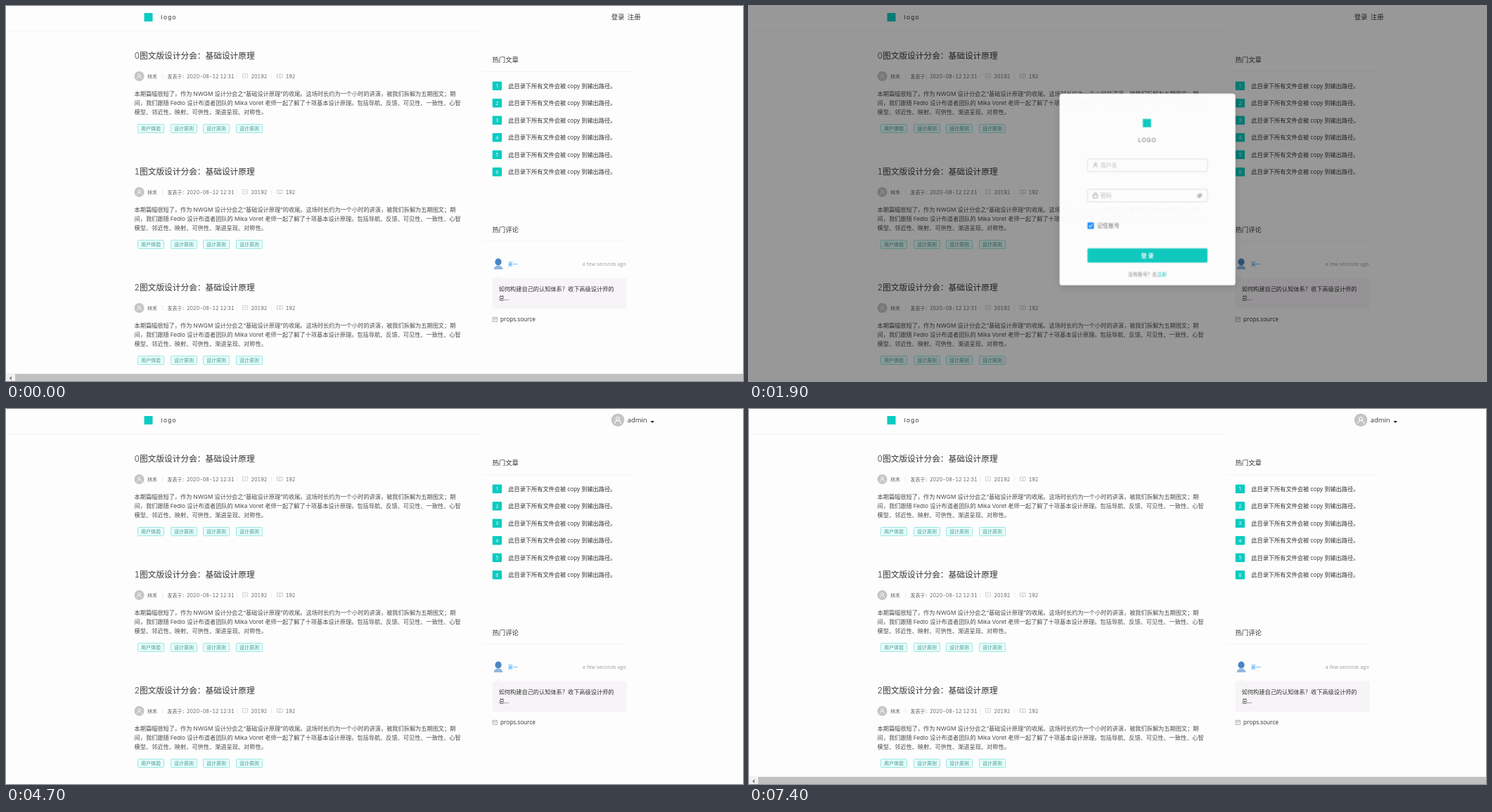
These frames come from a looping animation (1048x534 px, 9800 ms). An HTML page:

```html
<!DOCTYPE html>
<html lang="zh-CN">
<head>
<meta charset="utf-8">
<title>Login flow</title>
<style>
html, body { margin: 0; width: 100%; height: 100%; overflow: hidden; background: #fdfdfd; }
svg { display: block; width: 100vw; height: 100vh; }
text { white-space: pre; }
.ui { font-family: "Open Sans", "Noto Sans CJK SC", "Noto Sans CJK", sans-serif; }
.article { font-family: Inter, "Noto Sans CJK SC", "Noto Sans CJK", sans-serif; font-variant-numeric: tabular-nums; }
.anim { animation: 9800ms step-end infinite; }

#scrollbar { animation-name: scrollbar; }
#guest { animation-name: guest; }
#member { animation-name: member; }
#mask { animation-name: mask; }
#modal { animation-name: modal; transform-origin: 870px 16px; }
#hints { animation-name: hints; }
#filled { animation-name: filled; }
.value { animation-name: value; }
.autofill { animation-name: autofill; }
#glow { animation-name: glow; }
#popup { animation-name: popup; }
.modal-card { filter: drop-shadow(0 3px 6px rgba(0,0,0,.16)); }
.popup-card { filter: drop-shadow(0 1px 2px rgba(0,0,0,.5)); }

@keyframes scrollbar { 0% { opacity: 1 } 17.34% { opacity: 0 } 66.32%, 100% { opacity: 1 } }
@keyframes guest { 0% { opacity: 1 } 47.95%, 100% { opacity: 0 } }
@keyframes member { 0% { opacity: 0 } 47.95%, 100% { opacity: 1 } }
@keyframes mask {
  0% { opacity: 0 } 17.34% { opacity: .033 } 18.36% { opacity: .22 }
  19.38% { opacity: .4 } 20.4% { opacity: .45 } 47.95%, 100% { opacity: 0 }
}
@keyframes modal {
  0% { opacity: 0; transform: scale(.85) }
  18.36% { opacity: .81; transform: scale(.85) }
  19.38% { opacity: .97; transform: scale(.975) }
  20.4% { opacity: 1; transform: none }
  47.95%, 100% { opacity: 0; transform: none }
}
@keyframes hints { 0% { opacity: 1 } 20.4%, 100% { opacity: 0 } }
@keyframes filled { 0% { opacity: 0 } 20.4%, 100% { opacity: 1 } }
@keyframes value { 0% { fill: #888 } 23.46%, 100% { fill: #111 } }
@keyframes autofill { 0% { fill: #f0f5ff } 43.87%, 100% { fill: #e8f0fe } }
@keyframes glow { 0% { opacity: 0 } 43.87% { opacity: .8 } 45.91%, 100% { opacity: 1 } }
@keyframes popup {
  0% { opacity: 0; transform: translateY(-10px) }
  56.12% { opacity: .35; transform: translateY(-10px) }
  57.14% { opacity: .85; transform: translateY(-2px) }
  58.16% { opacity: 1; transform: none }
  66.32% { opacity: .7; transform: translateY(-2px) }
  67.34% { opacity: .2; transform: translateY(-8px) }
  68.36%, 100% { opacity: 0; transform: translateY(-10px) }
}
</style>
</head>
<body>
<svg id="stage" viewBox="0 0 1048 534" preserveAspectRatio="none"></svg>
<script>
const TEAL = '#0bcbc1', BLUE = '#1890ff', LINE = '#f1f1f1';
const SMALL = 7.03, BODY = 8.2, LARGE = 9.37, TITLE = 11.7, NOTE = 10.55;

// Text is placed by its left edge and the vertical centre of its glyphs.
const text = (x, cy, size, fill, str, extra = '') =>
  `<text x="${x}" y="${cy + size * .37}" font-size="${size}" fill="${fill}" ${extra}>${str}</text>`;
const rect = (x, y, w, h, fill, extra = '') =>
  `<rect x="${x}" y="${y}" width="${w}" height="${h}" fill="${fill}" ${extra}/>`;
const circle = (x, y, r, fill, extra = '') =>
  `<circle cx="${x}" cy="${y}" r="${r}" fill="${fill}" ${extra}/>`;
const path = (d, stroke, width = 1, extra = '') =>
  `<path d="${d}" fill="none" stroke="${stroke}" stroke-width="${width}" ${extra}/>`;
const group = (attrs, ...parts) => `<g ${attrs}>${parts.join('')}</g>`;
const range = (n, fn) => Array.from({ length: n }, (_, i) => fn(i)).join('');
const middle = 'text-anchor="middle"';

const person = (x, y, s, stroke) => group(`transform="translate(${x} ${y}) scale(${s})"`,
  circle(0, -1.4, 1.8, 'none', `stroke="${stroke}" stroke-width=".8"`),
  path('M-3.2 3.8C-3.2 -.4 3.2 -.4 3.2 3.8', stroke, .8));

const avatar = (x, y, r) => circle(x, y, r, '#c5c5c5') + person(x, y, r / 7, '#fff');

const star = (x, y, r, color, width) => range(3, i => {
  const a = Math.PI * (i / 3 + .5), dx = r * Math.cos(a), dy = r * Math.sin(a);
  return path(`M${x - dx} ${y - dy}L${x + dx} ${y + dy}`, color, width);
});

const tags = ['用户体验', '设计原则', '设计原则', '设计原则'];
const paragraph = [
  '本期篇幅很短了，作为 NWGM 设计分会之“基础设计原理”的收尾。这场时长约为一个小时的讲演，被我们拆解为五期图文；期',
  '间，我们跟随 Fedlo 设计布道者团队的 Mika Voret 老师一起了解了十项基本设计原理。包括导航、反馈、可见性、一致性、心智',
  '模型、邻近性、映射、可供性、渐进呈现、对称性。'
];

const article = i => group(`class="article" transform="translate(0 ${165 * i})"`,
  text(182.5, 70.5, TITLE, '#333', `${i}图文版设计分会：基础设计原理`, 'font-weight="300"'),
  avatar(189.5, 100, 7),
  text(201, 100, SMALL, '#666', '林禾'),
  text(229.5, 100, SMALL, '#666', '发表于：'),
  text(257, 100, SMALL, '#666', '2020-08-12 12:31'),
  [222.5, 328.5, 377.5].map(x => rect(x - .3, 96, .6, 8, '#e4e4e4')).join(''),
  path('M336.5 96.5h7v5.6h-4l-1.4 1.3v-1.3h-1.6zM338 99.4h4', '#b5b5b5', .6),
  text(348.5, 100, SMALL, '#666', '20192'),
  path('M385.5 97h3.2l.6.5.6-.5h3.2v5h-3.2l-.6.6-.6-.6h-3.2zM389.3 97.5v5', '#aaa', .6),
  text(397.7, 100, SMALL, '#666', '192'),
  paragraph.map((line, n) => text(182.5, 125 + 12.9 * n, BODY, '#4c4c4c', line)).join(''),
  tags.map((tag, n) => {
    const x = Math.round(187 + 46.6 * n) + .5;
    return rect(x, 168.5, 37, 12, '#e6fffb', 'rx="1" stroke="#9be6e0"') +
      text(x + 18.5, 174.3, SMALL, '#43928f', tag, middle);
  }).join(''));

const sidebar = () => group('class="ui"',
  text(691.5, 77, LARGE, '#333', '热门文章'),
  rect(678, 93, 217, .8, LINE),
  range(6, i => {
    const y = 113.6 + 24.5 * i;
    return rect(691.7, y - 6, 13.3, 12.5, TEAL, 'rx="1"') +
      text(698.3, y, SMALL, '#fff', i + 1, middle) +
      text(714.3, y, BODY, '#333', '此目录下所有文件会被 copy 到输出路径。');
  }),
  text(691.5, 318.5, LARGE, '#333', '热门评论'),
  rect(678, 334.6, 204, .8, LINE),
  '<ellipse cx="700" cy="364.5" rx="4.6" ry="5" fill="#4a86c4"/>',
  '<path d="M693.5 375q1-5.5 6.5-5.5t6.5 5.5z" fill="#8fb8e0"/>',
  text(713.8, 367, SMALL, BLUE, '吴一'),
  text(882, 367, SMALL, '#999', 'a few seconds ago', 'text-anchor="end" letter-spacing=".15"'),
  rect(691.5, 387.5, 191, 43.8, '#f7f4f7', 'rx="3"'),
  '<path d="M696 388l4-4 4 4z" fill="#f7f4f7"/>',
  text(700.7, 403, BODY, '#333', '如何构建自己的认知体系？收下高级设计师的'),
  text(700.7, 416, BODY, '#333', '总...'),
  path('M692 443.3h6.4v6.2h-6.4zM692 445h6.4M693.5 447h3', '#999', .7),
  text(703, 446, BODY, '#333', 'props.source'));

const header = () => group('class="ui"',
  rect(0, 35, 678, .8, LINE),
  rect(196.5, 10, 12, 12, TEAL),
  text(220.5, 15.7, BODY, '#333', 'logo', 'class="article" letter-spacing="1.4"'),
  group('id="guest" class="anim"',
    text(860.7, 16, LARGE, '#333', '登录'), text(883.8, 16, LARGE, '#333', '注册')),
  group('id="member" class="anim"',
    avatar(870, 15.7, 9.3), text(883.8, 16, LARGE, '#333', 'admin'),
    '<path d="M916.4 17h5.4l-2.7 3z" fill="#222"/>'));

const scrollbar = () => group('id="scrollbar" class="anim"',
  rect(0, 523, 1048, 11, '#f1f1f1'), rect(13, 524, 1035, 10, '#c1c1c1'),
  '<path d="M8 527v6l-3.5-3z" fill="#888"/>');

const field = y => rect(471.3, y, 175, 18.4, '#fff', 'rx="2" stroke="#d9d9d9" stroke-width=".8"');

const modal = () => group('id="modal" class="ui anim"',
  rect(430.5, 127.5, 256.5, 280, '#fff', 'rx="4" class="modal-card"'),
  rect(552, 164.5, 12, 12, TEAL),
  text(558.6, 195, BODY, '#666', 'LOGO', `class="article" letter-spacing="1" ${middle}`),
  field(222.8), field(267.2),
  person(483, 231.5, .95, '#999'),
  path('M479.5 275.5h6.5v4.2h-6.5zM480.8 275.5v-1.2q0-2 2-2t2 2v1.2', '#999', .8),
  path('M631.3 276.4q3.7-5 7.4 0q-3.7 5-7.4 0zM632.2 279.8l5.8-6.8', '#888', .8),
  circle(635, 276.4, 1.3, 'none', 'stroke="#888" stroke-width=".7"'),
  group('id="hints" class="anim"',
    text(490, 232, BODY, '#bfbfbf', '用户名'), text(490, 276.5, BODY, '#bfbfbf', '密码')),
  group('id="filled" class="anim"',
    rect(489, 225.2, 150.5, 13.6, '#e8f0fe', 'class="autofill anim"'),
    rect(489, 269.6, 140, 13.6, '#e8f0fe', 'class="autofill anim"'),
    text(489.5, 231.8, BODY, '#111', 'admin', 'class="value anim"'),
    range(6, i => circle(491.6 + 3.65 * i, 276.5, 1.35, '#111', 'class="value anim"'))),
  rect(471.3, 315.6, 9.4, 9.4, BLUE, 'rx="1.2"'),
  path('M473.5 320.2l1.9 2 3.3-3.8', '#fff', 1.2),
  text(485.3, 320.6, BODY, '#666', '记住账号'),
  group('id="glow" class="anim"',
    rect(469.8, 352.2, 178, 23.8, TEAL, 'rx="3" opacity=".18"'),
    rect(470.6, 353.2, 176.4, 22.4, TEAL, 'rx="3" opacity=".25"')),
  rect(471.3, 353.4, 175, 21, TEAL, 'rx="2"'),
  text(558.7, 364, BODY, '#fff', '登 录', `font-weight="600" ${middle}`),
  text(558.7, 391, SMALL, '#888', `没有账号？去<tspan fill="${TEAL}">注册</tspan>`, middle));

const illustration = () => [
  path('M361 24C378 22 384 36 398 38', '#dadce0', 4),
  path('M398 37Q420 53 442 37', '#bdc1c6', 4),
  star(407.5, 12, 8.5, '#dadce0', 3.2),
  rect(525, -40, 59, 88, '#f8f9fa', 'stroke="#dadce0"'),
  path('M519 51.5H595.5', '#bdc1c6', 1),
  path('M584 22C586 8 594 1 605 0', '#bdc1c6', 4),
  rect(460.5, -40, 59, 101.3, '#f8f9fa', 'rx="4" stroke="#c8cbd0"'),
  '<path d="M719.5 25.5a7.5 6.5 0 0 1 15 0z" fill="#dadce0"/>',
  rect(500, 14, 61, 21.6, '#fff', 'rx="2" stroke="#d5d8dc"'),
  range(3, i => star(516.5 + 12 * i, 25, 4.2, '#4285f4', 1.8)),
  rect(550, 19.5, 1.7, 11, '#4285f4'),
  '<path d="M490.5 6.5L510 37H471z" fill="#ea4335" stroke="#ea4335" stroke-width="3" stroke-linejoin="round"/>',
  rect(488.9, 17.5, 3.2, 9.5, '#fff'), rect(488.9, 29.5, 3.2, 3.2, '#fff')
].join('');

const popup = () => group('id="popup" class="ui anim"',
  rect(361.5, -40, 392.5, 255, '#fff', 'rx="4" class="popup-card"'),
  rect(361.5, -40, 392.5, 107, '#f8f9fa'),
  illustration(),
  text(375.8, 94.3, 13.1, '#202124', '检查您的密码'),
  text(375.8, 127, NOTE, '#5f6368', '某个网站或应用发生了数据泄露，导致您的密码外泄。Grovem 建议您立即检'),
  text(375.8, 144.5, NOTE, '#5f6368', '查您保存的密码。'),
  circle(382.7, 187.2, 5.6, 'none', 'stroke="#5f6368" stroke-width="1.2"'),
  rect(382, 186.3, 1.4, 4, '#5f6368'), rect(382, 183.8, 1.4, 1.4, '#5f6368'),
  rect(593, 173.2, 70, 28, '#3b85ea', 'rx="3" stroke="#8ab4f8"'),
  text(628, 187.5, NOTE, '#fff', '检查密码', `font-weight="500" ${middle}`),
  rect(670.5, 173.7, 69.5, 27.5, '#fff', 'rx="3" stroke="#dadce0"'),
  text(705.3, 187.5, NOTE, '#1a73e8', '关闭', `font-weight="500" ${middle}`));

document.getElementById('stage').innerHTML = [
  rect(0, 0, 1048, 534, '#fdfdfd'),
  header(), range(3, article), sidebar(), scrollbar(),
  rect(0, 0, 1048, 534, '#000', 'id="mask" class="anim"'),
  modal(), popup()
].join('');
</script>
</body>
</html>
```
